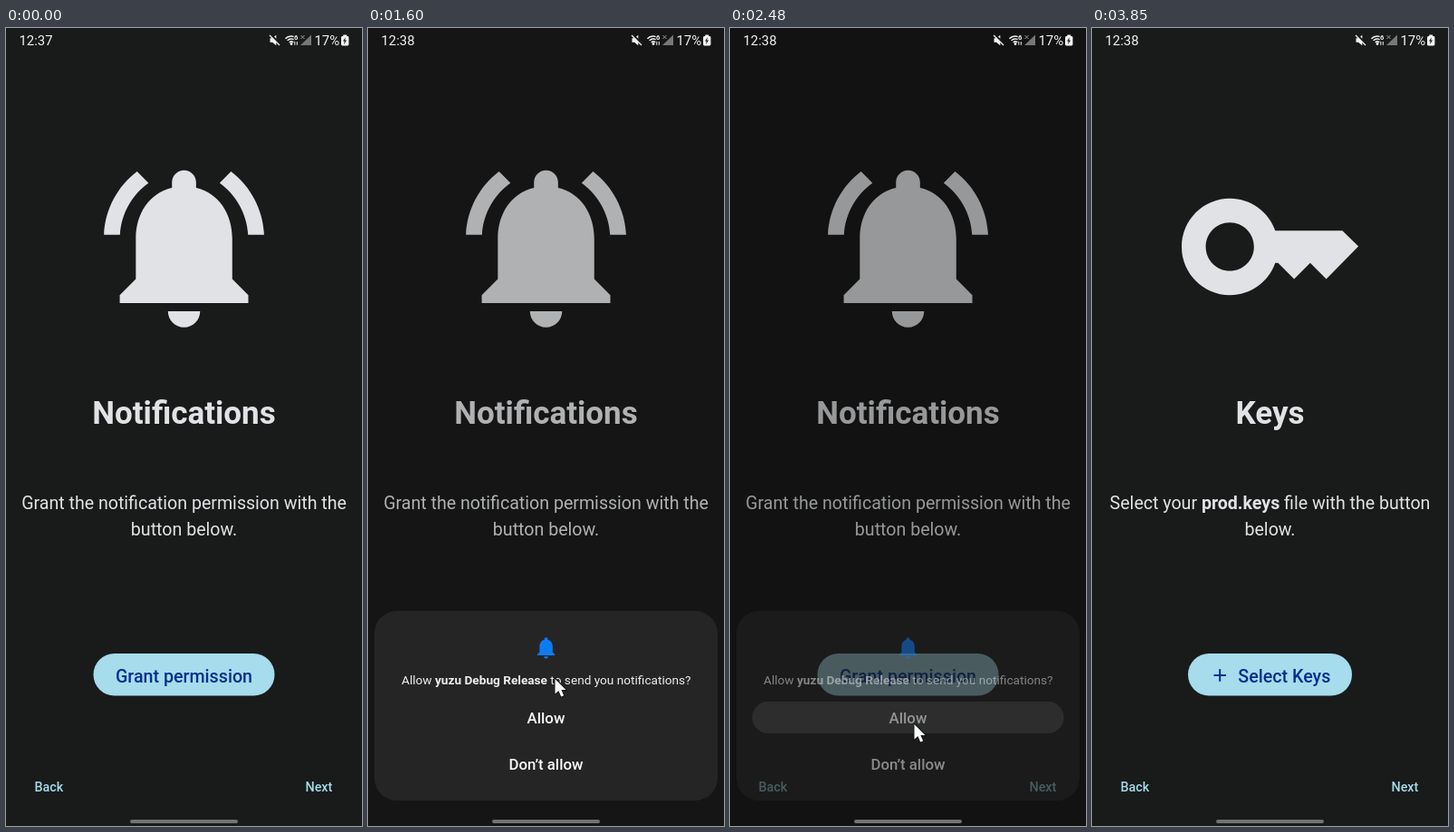
These frames come from a looping animation (393x879 px, 3980 ms). An HTML page with a canvas:

```html
<!DOCTYPE html>
<html lang="en">
<head>
<meta charset="utf-8">
<title>Setup walkthrough</title>
<style>
html, body { margin: 0; width: 100%; height: 100%; overflow: hidden; background: #191b1a; }
canvas { display: block; width: 393px; height: 879px; }
</style>
</head>
<body>
<canvas id="stage"></canvas>
<script>
const W = 393, H = 879, MID = W / 2, LOOP = 3980;
const BG = '#191b1a', INK = '#e1e2e5', ACCENT = '#a6dceb', NAVY = '#00308b';
const canvas = document.getElementById('stage');
const ctx = canvas.getContext('2d');
const ratio = window.devicePixelRatio || 1;
canvas.width = W * ratio;
canvas.height = H * ratio;

const ticks = [0, 730, 800, 870, 940, 1010, 1080, 1150,
  1280, 1350, 1420, 1490, 1600, 1670, 1740,
  1810, 1880, 1950, 2020, 2080,
  2280, 2410, 2480, 2550, 2620, 2690, 2760,
  2830, 2900, 2970, 3040, 3180, 3250, 3310,
  3380, 3450, 3520, 3590, 3660, 3850];

const pointerPath = [[730, 140, 866], [1080, 203, 722], [1150, 203, 722], [1280, 206, 717],
  [1810, 206, 717], [2020, 203, 767], [2830, 203, 767], [3180, 245, 811],
  [3520, 282, 849], [3850, 306, 890]];

const bell = new Path2D('M18 11c0-3.07-1.64-5.64-4.5-6.32V4c0-.83-.67-1.5-1.5-1.5s-1.5.67-1.5 1.5v.68C7.63 5.36 6 7.92 6 11v5l-2 2v1h16v-1l-2-2zM12 22c1.1 0 2-.9 2-2h-4c0 1.1.9 2 2 2z');
const waves = new Path2D('M7.58 4.08L6.15 2.65C3.75 4.48 2.17 7.3 2.03 10.5h2c.15-2.65 1.51-4.97 3.55-6.42zM19.97 10.5h2c-.15-3.2-1.73-6.02-4.12-7.85l-1.42 1.43c2.02 1.45 3.39 3.77 3.54 6.42z');
const key = new Path2D('M21 10h-8.35C11.83 7.67 9.61 6 7 6c-3.31 0-6 2.69-6 6s2.69 6 6 6c2.61 0 4.83-1.67 5.65-4H13l2 2 2-2 2 2 4-4.04zM7 15c-1.65 0-3-1.35-3-3s1.35-3 3-3 3 1.35 3 3-1.35 3-3 3z');
const arrow = new Path2D('M0 0V16.6L3.9 13 6.7 19.6 9.7 18.3 6.9 12H12z');
const speaker = new Path2D('M291.5 11.3h2.6l4.2-3.6v11.6l-4.2-3.6h-2.6z');
const bolt = new Path2D('M374.8 10.2l-2.8 4.4h1.7l-.7 3.4 3-4.5h-1.8z');

const clamp = v => Math.min(1, Math.max(0, v));
const ramp = (t, from, to) => clamp((t - from) / (to - from));
const mix = (a, b, p) => a + (b - a) * p;

function text(runs, x, y, size, color, align = 'center') {
  const font = weight => { ctx.font = `${weight} ${size}px Roboto, sans-serif`; };
  const widths = runs.map(([weight, s]) => { font(weight); return ctx.measureText(s).width; });
  if (align === 'center') x -= widths.reduce((a, b) => a + b) / 2;
  ctx.fillStyle = color;
  runs.forEach(([weight, s], i) => {
    font(weight);
    ctx.fillText(s, x, y);
    x += widths[i];
  });
}

function pill(x, y, w, h, r, color) {
  ctx.fillStyle = color;
  ctx.beginPath();
  ctx.roundRect(x, y, w, h, r);
  ctx.fill();
}

function shape(paths, x, y, scale, color) {
  ctx.save();
  ctx.translate(x, y);
  ctx.scale(scale, scale);
  ctx.fillStyle = color;
  paths.forEach(p => ctx.fill(p));
  ctx.restore();
}

function line(color, width, ...points) {
  ctx.strokeStyle = color;
  ctx.lineWidth = width;
  ctx.beginPath();
  points.forEach(([x, y], i) => i ? ctx.lineTo(x, y) : ctx.moveTo(x, y));
  ctx.stroke();
}

function notificationPage(hover) {
  shape([bell, waves], 90.1, 134.5, 8.87, INK);
  text([[700, 'Notifications']], MID, 436, 35, INK);
  text([[400, 'Grant the notification permission with the']], MID, 529.5, 19.6, INK);
  text([[400, 'button below.']], MID, 558.5, 19.6, INK);
  const rgb = [mix(166, 123, hover), mix(220, 176, hover), mix(235, 215, hover)];
  pill(96.5, 689, 200, 46.5, 23.25, `rgb(${rgb})`);
  text([[500, 'Grant permission']], MID, 720.5, 19.65, NAVY);
}

function keysPage() {
  shape([key], 90.1, 134.5, 8.87, INK);
  text([[700, 'Keys']], MID, 436, 35, INK);
  text([[400, 'Select your '], [700, 'prod.keys'], [400, ' file with the button']], MID, 529.5, 19.6, INK);
  text([[400, 'below.']], MID, 558.5, 19.6, INK);
  pill(106, 689, 181, 46.5, 23.25, ACCENT);
  line(NAVY, 2, [134.5, 713], [148, 713]);
  line(NAVY, 2, [141.2, 706.2], [141.2, 719.8]);
  text([[500, 'Select Keys']], 212.3, 720.5, 19.65, NAVY);
}

function pages(t) {
  const offset = W * (1 - ramp(t, 2480, 2762)) ** 5;
  const slide = (x, draw) => {
    if (Math.abs(x) >= W) return;
    ctx.save();
    ctx.translate(x, 0);
    draw();
    ctx.restore();
  };
  slide(offset - W, () => notificationPage(ramp(t, 940, 1080) * (1 - ramp(t, 1600, 1740))));
  slide(offset, keysPage);
  text([[500, 'Back']], 31.5, 841, 14.3, ACCENT, 'left');
  text([[500, 'Next']], 330.5, 841, 14.3, ACCENT, 'left');
}

function dialog(t) {
  const closing = ramp(t, 2410, 2550);
  const dim = 0.66 * ramp(t, 1530, 1740) * (1 - closing);
  ctx.fillStyle = `rgba(0,0,0,${dim})`;
  ctx.fillRect(0, 0, W, H);

  const enter = ramp(t, 1380, 1590);
  const alpha = enter * (1 - closing);
  if (!alpha) return;
  ctx.save();
  ctx.globalAlpha = alpha;
  ctx.translate(0, 70 * (1 - enter) ** 2);
  pill(7, 642, 379, 209, 25, '#252525');
  shape([bell], 182.2, 668.2, 1.2, '#0d7cf2');
  text([[400, 'Allow '], [700, 'yuzu Debug Release'], [400, ' to send you notifications?']], MID + .3, 723, 13.65, '#ededed');
  const hover = ramp(t, 1880, 2020);
  if (hover) {
    ctx.globalAlpha = alpha * hover;
    pill(24.5, 742, 344, 35, 17.5, t < 2280 ? '#3a3a3a' : '#404040');
    ctx.globalAlpha = alpha;
  }
  text([[500, 'Allow']], MID, 766, 16.8, '#fafafa');
  text([[500, 'Don’t allow']], MID, 816.5, 16.8, '#fafafa');
  ctx.restore();
}

function statusBar(t) {
  const white = '#f2f2f2';
  text([[400, t < 1150 ? '12:37' : '12:38']], 14.5, 18.5, 14.9, white, 'left');
  text([[400, '17%']], 340.5, 18.5, 14.9, white, 'left');

  ctx.fillStyle = white;
  ctx.fill(speaker);
  line(BG, 2.4, [292, 7], [303, 18]);
  line(white, 1.2, [291, 8], [302, 19]);

  for (const r of [3, 6, 9]) {
    ctx.lineWidth = 1.4;
    ctx.strokeStyle = white;
    ctx.beginPath();
    ctx.arc(315, 18, r, -Math.PI * .76, -Math.PI * .24);
    ctx.stroke();
  }
  ctx.beginPath();
  ctx.arc(315, 17.5, 1.4, 0, 7);
  ctx.fill();
  ctx.fillStyle = BG;
  ctx.fillRect(317.6, 7, 6, 7);
  text([[700, '6']], 318, 13.2, 7.5, white, 'left');
  line(white, 1, [318.8, 15], [318.8, 18.8]);
  line(white, 1, [321.3, 15], [321.3, 18.8]);

  ctx.fillStyle = '#777';
  ctx.beginPath();
  ctx.moveTo(325, 19);
  ctx.lineTo(337, 19);
  ctx.lineTo(337, 7.5);
  ctx.fill();
  line('#999', 1, [325.5, 8], [329.5, 12]);
  line('#999', 1, [329.5, 8], [325.5, 12]);

  pill(372.2, 7.5, 4, 2, .5, white);
  pill(370, 9, 8.4, 10.4, 1.4, white);
  ctx.fillStyle = BG;
  ctx.fill(bolt);
}

function pointer(t) {
  const next = pointerPath.findIndex(p => p[0] > t);
  if (next < 1) return;
  const [t0, x0, y0] = pointerPath[next - 1];
  const [t1, x1, y1] = pointerPath[next];
  const p = ramp(t, t0, t1);
  ctx.save();
  ctx.globalAlpha = t >= 1010 && t < 1150 ? .75 : 1;
  ctx.translate(mix(x0, x1, p) + .5, mix(y0, y1, p));
  ctx.lineJoin = 'round';
  ctx.lineWidth = 1.8;
  ctx.strokeStyle = '#101418';
  ctx.stroke(arrow);
  ctx.fillStyle = '#f8fafb';
  ctx.fill(arrow);
  ctx.restore();
}

function draw(now) {
  const time = now % LOOP;
  const t = ticks.findLast(tick => tick <= time);
  ctx.setTransform(ratio, 0, 0, ratio, 0, 0);
  ctx.fillStyle = BG;
  ctx.fillRect(0, 0, W, H);
  pages(t);
  dialog(t);
  statusBar(t);
  pill(137, 872, 119, 4, 2, '#727272');
  pointer(t);
}

const start = performance.now();
function loop() {
  draw(performance.now() - start);
  requestAnimationFrame(loop);
}
loop();
</script>
</body>
</html>
```
